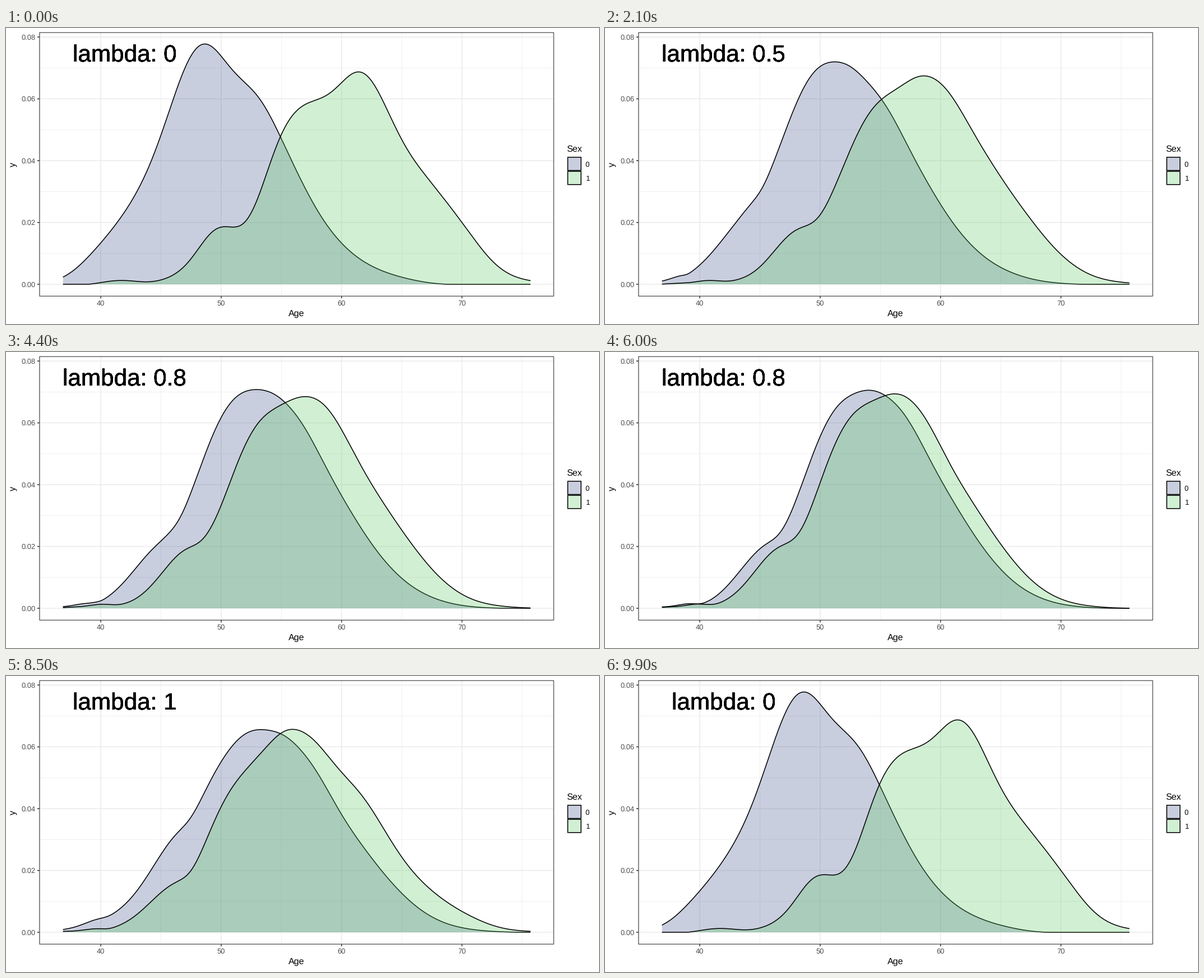
Recreate the animation shown at these times as a matplotlib script. Size 1058 px wide and 529 px high, loop 10 s.

```python
import numpy as np
import matplotlib.pyplot as plt
from matplotlib.animation import FuncAnimation
from matplotlib.patches import Rectangle

WIDTH, HEIGHT, DPI = 1058, 529, 64
PT = 72 / DPI  # points per pixel
LEFT, RIGHT, TOP, BOTTOM = 59.8, 977.2, 8.2, 479.2
BASELINE = 458
FILLS = ("#3B528B", "#5DC863")
ALPHA = 0.28
LINE = 1.55
LAMBDAS = (0, 0.5, 0.8, 1)

# Key points of the two starting densities: (age, density in thousandths).
START_POINTS = (
    ((34, 0.3), (37, 2.6), (40, 13.4), (43, 30), (46, 59.7), (48.5, 77.7),
     (50.5, 71.4), (53, 61), (56, 38.8), (59, 18), (62, 7), (65, 2.3), (68, 0.2)),
    ((39, 0), (42.5, 1.1), (44.5, 1), (46, 3), (48, 10.9), (50, 18.5), (52, 20.3),
     (54, 38.4), (56, 55), (58, 59.8), (61.3, 68.7), (64, 54.7), (67, 35.1),
     (70, 20), (73, 5.8), (76, 1)),
)

# Frames at which the state position starts or stops moving.
KEY_FRAMES = (0, 5, 25, 31, 50, 55, 74, 80, 99)
KEY_STATES = (0, 0, 1, 1, 2, 2, 3, 3, 4)

plt.rcParams.update({"font.family": "Liberation Sans", "text.hinting": "none",
                     "path.snap": False})


def age_x(age):
    return 169.1 + 21.48 * (age - 40)


def density_y(density):
    return BASELINE - 5523 * density


def smooth_density(points, ages, width=2):
    """Sum of Gaussian bumps passing through the key points."""
    centers, values = np.array(points, float).T

    def bumps(x):
        return np.exp(-((x[:, None] - centers) / width) ** 2 / 2)

    weights = np.linalg.solve(bumps(centers), values / 1000)
    return np.maximum(bumps(ages) @ weights, 1e-7)


def move_towards(own, other, share, grid):
    """Density after each quantile moves by `share` towards the other group's."""
    own_cdf, other_cdf = (np.cumsum(d) / d.sum() for d in (own, other))
    partner = np.interp(own_cdf, other_cdf, grid)
    moved = (1 - share) * grid + share * partner
    partner_density = np.interp(partner, grid, other)
    return moved, 1 / ((1 - share) / own + share / partner_density)


GRID = np.linspace(30, 84, 4000)
AGES = np.linspace(36.86, 75.69, 500)
XS = age_x(AGES)
START = [smooth_density(points, GRID) for points in START_POINTS]
CURVES = np.array([[np.interp(AGES, *move_towards(START[sex], START[1 - sex], lam / 2, GRID))
                    for sex in (0, 1)] for lam in LAMBDAS])

fig = plt.figure(figsize=(WIDTH / DPI, HEIGHT / DPI), dpi=DPI, facecolor="white")
ax = fig.add_axes([0, 0, 1, 1])
ax.set(xlim=(0, WIDTH), ylim=(HEIGHT, 0))
ax.axis("off")


def segment(x, y, color, width, z):
    ax.plot(x, y, color=color, lw=width * PT, zorder=z, solid_capstyle="butt")


def write(x, y, text, size, color="black", ha="center", **kwargs):
    return ax.text(x, y, text, fontsize=size * PT, color=color, ha=ha,
                   va="baseline", zorder=8, **kwargs)


def draw_axes():
    grid, dark, label = "#EBEBEB", "#333333", "#4D4D4D"
    for age in range(35, 80, 5):
        major = age % 10 == 0
        x = age_x(age)
        segment((x, x), (TOP, BOTTOM), grid, LINE if major else LINE / 2, 1 + major)
        if major:
            segment((x, x), (BOTTOM, BOTTOM + 4), dark, LINE, 6)
            write(x, 496, str(age), 12.84, label)
    for step in range(9):
        major = step % 2 == 0
        y = density_y(step / 100)
        segment((LEFT, RIGHT), (y, y), grid, LINE if major else LINE / 2, 1 + major)
        if major:
            segment((LEFT - 4, LEFT), (y, y), dark, LINE, 6)
            write(53, y + 4.6, f"{step / 100:.2f}", 12.84, label, ha="right")
    ax.add_patch(Rectangle((LEFT, TOP), RIGHT - LEFT, BOTTOM - TOP, fill=False,
                           ec=dark, lw=1.1 * PT, zorder=7))
    write(518, 515, "Age", 16.05)
    write(16.5, 244, "y", 16.05, rotation=90, rotation_mode="anchor")


def draw_legend():
    write(1000.5, 220.5, "Sex", 16.05, ha="left")
    for sex, fill in enumerate(FILLS):
        corner = (1002.3, 231 + 25.2 * sex)
        ax.add_patch(Rectangle(corner, 23.6, 23.6, fc=fill, alpha=ALPHA, lw=0))
        ax.add_patch(Rectangle(corner, 23.6, 23.6, fill=False, ec="black", lw=LINE * PT))
        write(1034, 247.4 + 25.2 * sex, str(sex), 12.84, ha="left")


draw_axes()
draw_legend()

areas, outlines = [], []
for sex, fill in enumerate(FILLS):
    areas += ax.fill(XS, XS * 0, fc=fill, alpha=ALPHA, lw=0, zorder=3 + sex)
    outlines += ax.plot(XS, XS * 0, color="black", lw=LINE * PT, zorder=3.5 + sex,
                        solid_capstyle="butt")

# Stacked copies harden the glyph edges.
titles = [write(211.7, 59.5, "", 42.3) for _ in range(6)]


def update(frame):
    position = np.interp(frame, KEY_FRAMES, KEY_STATES)
    state = min(int(position), 3)
    t = position - state
    densities = (1 - t) * CURVES[state] + t * CURVES[(state + 1) % 4]
    for area, outline, density in zip(areas, outlines, densities):
        ys = density_y(density)
        outline.set_data(XS, ys)
        area.set_xy(np.column_stack((np.r_[XS, XS[-1], XS[0]],
                                     np.r_[ys, BASELINE, BASELINE])))
    for title in titles:
        title.set_text(f"lambda: {LAMBDAS[int(position + 0.5) % 4]}")
    return [*areas, *outlines, *titles]


animation = FuncAnimation(fig, update, frames=100, interval=100, repeat=True,
                          repeat_delay=0, blit=False)
plt.show()
```
